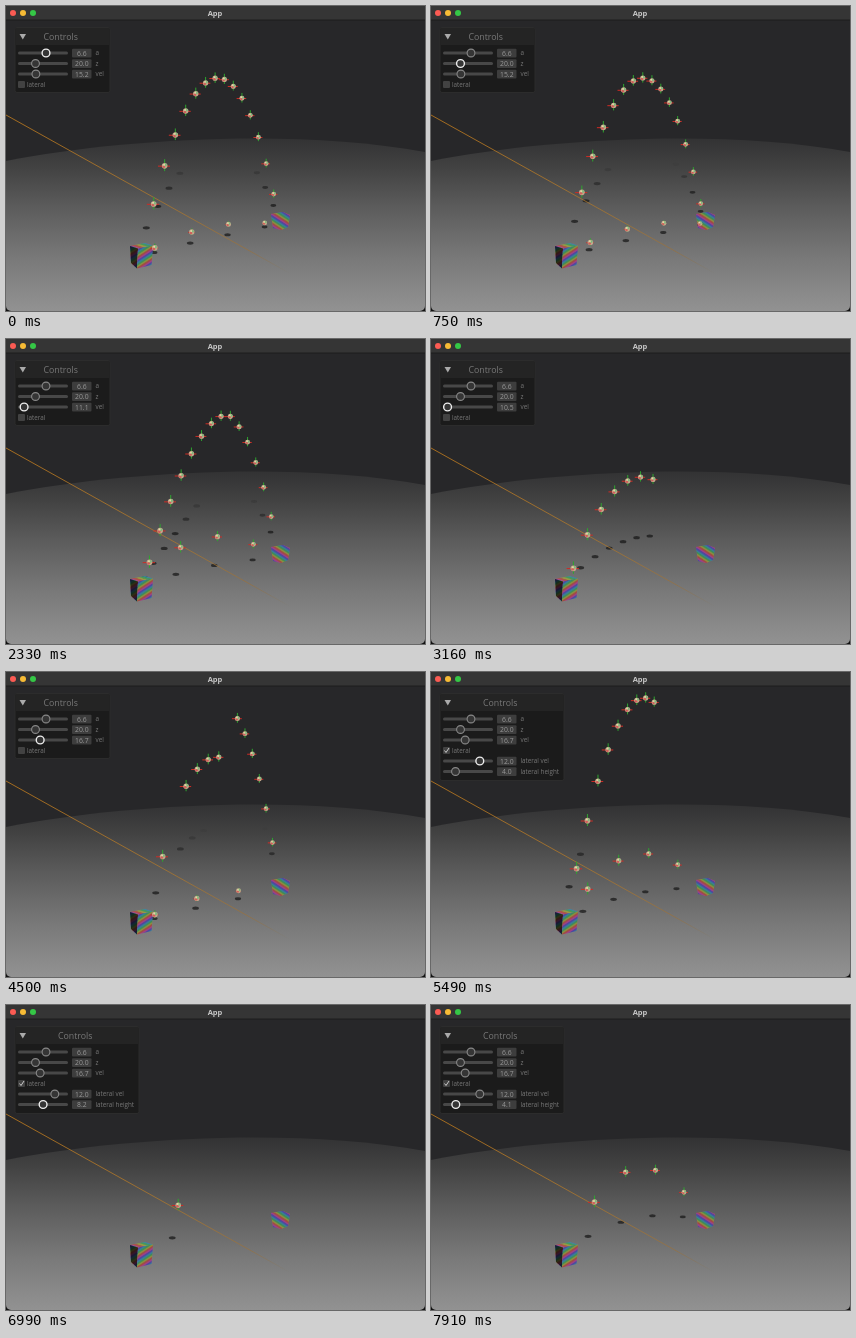
Animation, 419 px wide and 305 px high, one loop 7.99 s. Source, as an HTML page with a canvas:

```html
<!DOCTYPE html>
<html lang="en">
<head>
<meta charset="utf-8">
<title>App</title>
<style>
  html, body { margin: 0; width: 100%; height: 100%; overflow: hidden; background: #111; }
  canvas, svg { position: absolute; left: 0; top: 0; width: 419px; height: 305px; }
  canvas { border-radius: 0 0 5px 5px; }
  text { font-family: "Open Sans", "Noto Sans", sans-serif; font-size: 6.3px; fill: #787878; }
  .title { font-size: 7.5px; font-weight: 700; fill: #c8c8c8; text-anchor: middle; }
  .heading { font-size: 8.8px; }
  .value { font-size: 6.8px; fill: #999; text-anchor: middle; }
  .knob { fill: #353535; stroke: #888; stroke-width: 1.1; }
  .active .knob { stroke: #eee; stroke-width: 1.4; }
</style>
</head>
<body>
<canvas id="scene" width="419" height="305"></canvas>
<svg viewBox="0 0 419 305">
  <rect width="419" height="14" fill="#353535"/>
  <path d="M0 14H419" stroke="#1c1c1c"/>
  <circle cx="7" cy="7" r="3" fill="#fb5b53"/>
  <circle cx="17" cy="7" r="3" fill="#f7bb35"/>
  <circle cx="27" cy="7" r="3" fill="#35c746"/>
  <text class="title" x="209" y="9.6">App</text>
  <rect id="panel" x="9" y="21.5" rx="2" fill="#191919" fill-opacity=".85" stroke="#2c2c2c"/>
  <rect id="header" x="9.5" y="22" height="17" fill="#242424"/>
  <path d="M13.5 28H20L16.8 33.5Z" fill="#aaa"/>
  <text id="heading" class="heading" y="33.6">Controls</text>
  <g id="rows"></g>
  <rect x="12" y="75" width="7" height="7" rx="1" fill="#424242"/>
  <path id="tick" d="M13.5 78.5L15 80.5L18 76" fill="none" stroke="#c8c8c8"/>
  <text x="21" y="80.8">lateral</text>
</svg>
<script>
const LOOP = 7990, STEP = LOOP / 96, LATERAL_ON = 4950;
const $ = id => document.getElementById(id);
const ctx = $('scene').getContext('2d');

// Piecewise linear value from [time, value] pairs.
function track(keys, t) {
  for (let i = 1; i < keys.length; i++) {
    const [t0, a] = keys[i - 1], [t1, b] = keys[i];
    if (t < t1) return a + (b - a) * Math.max(0, (t - t0) / (t1 - t0));
  }
  return keys[keys.length - 1][1];
}

// ---- control panel ----
const sliders = [
  { label: 'a', y: 47, keys: [[0, 6.6]], knob: v => 40, from: 0, to: 700 },
  { label: 'z', y: 57.5, keys: [[0, 20]], knob: v => 29.5, from: 700, to: 1100 },
  { label: 'vel', y: 68, keys: [[0, 15.2], [1100, 15.2], [1490, 15], [2450, 10.5], [3160, 10.5], [3900, 16.7]],
    knob: v => 16.5 + (v - 10.5) * 2.85, from: 1100, to: 4800 },
  { label: 'lateral vel', y: 89, keys: [[0, 12]], knob: v => 48.8, from: 5100, to: 5800, lateral: true },
  { label: 'lateral height', y: 99.5, keys: [[0, 4], [5800, 4], [6800, 8.2], [7160, 8.2], [7410, 4.1]],
    knob: v => 24.5 + (v - 4) * 3, from: 5800, to: LOOP, lateral: true }
];

$('rows').innerHTML = sliders.map(({ label, y }) => `<g>
  <rect x="12" y="${y - 1.5}" width="50" height="3" rx="1.5" fill="#484848"/>
  <circle class="knob" cy="${y}" r="3.9"/>
  <rect x="66" y="${y - 4.2}" width="19.5" height="8.6" rx="1" fill="#3d3d3d"/>
  <text class="value" x="75.8" y="${y + 2.5}"></text>
  <text x="89.5" y="${y + 2.2}">${label}</text></g>`).join('');
const rows = [...$('rows').children];

function drawPanel(t) {
  const open = t >= LATERAL_ON, width = open ? 124 : 95;
  $('panel').setAttribute('width', width);
  $('panel').setAttribute('height', open ? 87 : 65);
  $('header').setAttribute('width', width - 1);
  $('heading').setAttribute('x', open ? 52 : 37.5);
  $('tick').style.display = open ? '' : 'none';
  sliders.forEach((s, i) => {
    const row = rows[i], value = track(s.keys, t);
    row.style.display = s.lateral && !open ? 'none' : '';
    row.setAttribute('class', t >= s.from && t < s.to ? 'active' : '');
    row.querySelector('.knob').setAttribute('cx', s.knob(value));
    row.querySelector('.value').textContent = value.toFixed(1);
  });
}

// ---- scene ----
function gradient(g, stops) {
  stops.forEach(([p, c]) => g.addColorStop(p, c));
  return g;
}
const ground = gradient(ctx.createLinearGradient(0, 130, 0, 305), [
  [0, '#313132'], [.17, '#414141'], [.4, '#5b5b5b'], [.7, '#797979'], [1, '#929292']]);
const beam = gradient(ctx.createLinearGradient(0, 109, 285, 268), [
  [0, '#c47d1c'], [.6, '#a8752e'], [.85, '#957142'], [1, 'rgba(130,115,90,0)']]);
const hues = ['#b94b9c', '#5a54bd', '#4192b4', '#4aa765', '#a4a64a', '#bd5a4d'];

function polygon(points) {
  ctx.beginPath();
  points.forEach(([x, y]) => ctx.lineTo(x, y));
  ctx.closePath();
}

function stripedFace(points, slope, shade) {
  const [x, y] = points[0];
  ctx.save();
  polygon(points);
  ctx.clip();
  ctx.lineWidth = 2;
  for (let i = -18; i < 24; i++) {
    ctx.strokeStyle = hues[(i + 18) % 6];
    ctx.beginPath();
    ctx.moveTo(x - 5, y + i * 1.8 - 5 * slope);
    ctx.lineTo(x + 30, y + i * 1.8 + 30 * slope);
    ctx.stroke();
  }
  ctx.fillStyle = `rgba(0,0,0,${shade})`;
  ctx.fillRect(x - 10, y - 20, 50, 60);
  ctx.restore();
}

function drawBoxes() {
  stripedFace([[124, 240], [139, 237], [147, 239.5], [132, 242.5]], .3, .08);
  stripedFace([[124, 240], [132, 242.5], [131, 262.5], [125, 257]], -.6, .72);
  stripedFace([[132, 242.5], [147, 239.5], [145.5, 259], [131, 262.5]], -.65, .15);
  stripedFace([[265, 208], [277, 206], [284, 209], [282, 221], [275, 224], [267, 222]], .65, .15);
}

// Each stream fires balls every `gap` ms; `rise` is the arc height in px at launch time.
const streams = [
  { start: -1555, gap: 102.8, count: 38, flight: 1542, rise: [[0, 162], [1450, 162], [2250, 112]], end: 2480 },
  { start: -1580, gap: 102.8, count: 38, flight: 390, rise: [[0, 13], [1450, 13], [2250, 40]], end: 2480 },
  { start: 2493, gap: 102.7, count: 7, flight: 1130, rise: [[0, 96]], end: 4300 },
  { start: 3200, gap: 84, count: 6, flight: 1398, rise: [[0, 202]], end: 5000 },
  { start: 3806, gap: 102, count: 4, flight: 1360, rise: [[0, 149]], end: 5000 },
  { start: 4310, gap: 102, count: 1, flight: 1360, rise: [[0, 120]], end: 5000 },
  { start: 3747, gap: 102, count: 11, flight: 340, rise: [[0, 11]], end: 5200 },
  { start: 4573, gap: 102.8, count: 19, flight: 1640, rise: [[0, 208]], end: 6700 },
  { start: 4909, gap: 102.8, count: 17, flight: 478, rise: [[0, 52], [5600, 52], [6500, 85]], end: 6830 },
  { start: 6870, gap: 102.8, count: 1, flight: 478, rise: [[0, 52]], end: 7160 },
  { start: 7405, gap: 102.8, count: 6, flight: 478, rise: [[0, 71]], end: LOOP }
];

function ballAt(u, rise) {
  const arc = 4 * u * (1 - u), lift = rise * arc * (1.12 - .24 * u);
  const x = 135 + 139 * u + .05 * rise * arc, floor = 250 - 32 * u;
  return {
    u, x, y: floor - lift, arm: (rise < 30 ? 4.5 : 7) - 2.5 * u,
    shadowX: x - 8 * (1 - u) * Math.min(1, lift / 40),
    shadowY: floor - (.0031 * rise + .07) * rise * arc
  };
}

function liveBalls(t) {
  const balls = [];
  for (const s of streams) {
    if (t >= s.end) continue;
    for (let i = 0; i < s.count; i++) {
      const launch = s.start + i * s.gap, u = (t - launch) / s.flight;
      if (u > .03 && u < .97) balls.push(ballAt(u, track(s.rise, launch)));
    }
  }
  return balls;
}

function disc(x, y, rx, ry, color) {
  ctx.fillStyle = color;
  ctx.beginPath();
  ctx.ellipse(x, y, rx, ry, 0, 0, 2 * Math.PI);
  ctx.fill();
}

function drawShadow({ u, shadowX, shadowY }) {
  const alpha = Math.min(.72, Math.max(0, (shadowY - 156) / 45));
  disc(shadowX, shadowY, 3.6 - .7 * u, 1.7 - .3 * u, `rgba(22,22,22,${alpha})`);
}

function drawBall({ u, x, y, arm }) {
  const r = 2.9 - .6 * u;
  ctx.lineWidth = 1;
  ctx.strokeStyle = '#cf2a24';
  ctx.beginPath();
  ctx.moveTo(x - arm, y + .3);
  ctx.lineTo(x + arm * .8, y + .3);
  ctx.stroke();
  ctx.strokeStyle = '#2da52f';
  ctx.beginPath();
  ctx.moveTo(x, y - arm);
  ctx.lineTo(x, y + arm * .8);
  ctx.stroke();
  disc(x, y, r, r, '#c5a88c');
  disc(x - r * .3, y + r * .35, r * .5, r * .45, '#d0605a');
  disc(x + r * .35, y - r * .3, r * .45, r * .5, '#83b77e');
  disc(x - r * .2, y - r * .4, r * .35, r * .35, '#e0d9a4');
}

function drawBackdrop() {
  ctx.fillStyle = '#272729';
  ctx.fillRect(0, 0, 419, 305);
  ctx.fillStyle = ground;
  ctx.beginPath();
  ctx.moveTo(0, 155);
  ctx.bezierCurveTo(110, 133, 290, 122, 419, 146);
  ctx.lineTo(419, 305);
  ctx.lineTo(0, 305);
  ctx.fill();
}

function drawScene(t) {
  drawBackdrop();
  const balls = liveBalls(t);
  balls.forEach(drawShadow);
  ctx.strokeStyle = beam;
  ctx.lineWidth = .8;
  ctx.beginPath();
  ctx.moveTo(0, 109);
  ctx.lineTo(285, 268);
  ctx.stroke();
  drawBoxes();
  balls.forEach(drawBall);
}

const begin = performance.now();
function tick() {
  const now = (performance.now() - begin) % LOOP;
  const t = Math.min(95, Math.floor((now + 10) / STEP)) * STEP;
  drawScene(t);
  drawPanel(t);
  requestAnimationFrame(tick);
}
tick();
</script>
</body>
</html>
```
